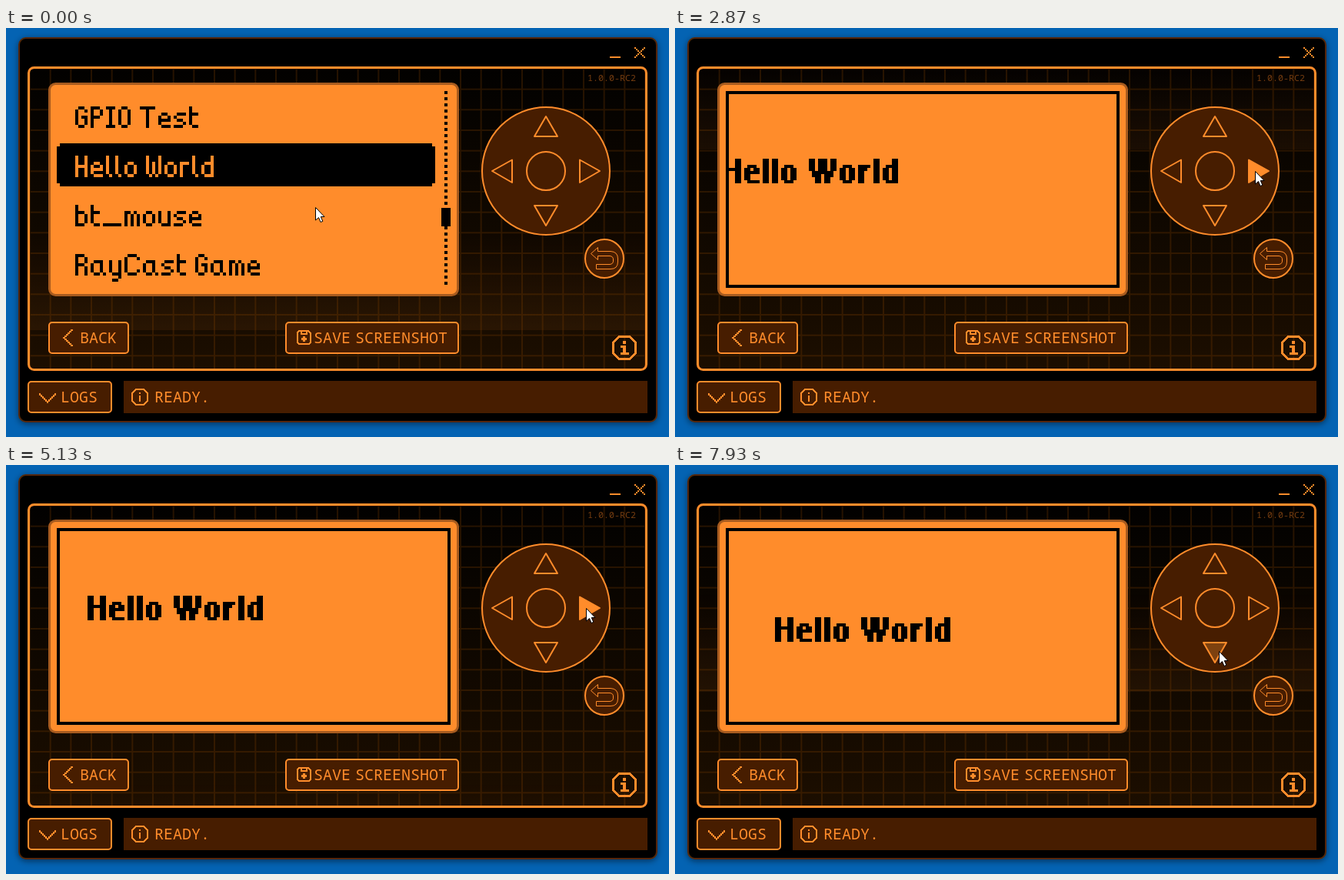
An HTML page for the animation above (8 s loop, 862 by 532 pixels).

```html
<!DOCTYPE html>
<html lang="en">
<head>
<meta charset="utf-8">
<title>Device screen</title>
<style>
  html, body { margin: 0; width: 100%; height: 100%; overflow: hidden; background: #0463b3; }
  svg { display: block; width: 862px; height: 532px; --o: #ff8c2b; --b: #471d00; }
  text { font: 20px "Noto Sans Mono", "DejaVu Sans Mono", monospace; fill: var(--o); word-spacing: -6px; }
  .version { font-size: 11.67px; fill: #753d10; }
  .btn { fill: var(--b); stroke: var(--o); stroke-width: 2; stroke-linejoin: round; }
  .line { fill: none; stroke: var(--o); stroke-width: 2; }
  .solid { fill: var(--o); }
  .pixel { shape-rendering: crispEdges; }
  .glyphs { fill: none; stroke: #000; stroke-linecap: square; }
  .glyphs.light { stroke: var(--o); }
  .hover { fill: #7d410f; }
  .press { fill: var(--o); }

  #band, #cursor, #menu, #app { animation: 8s linear infinite; }
  #band { animation-name: sweep; }
  #cursor { animation-name: point; animation-timing-function: ease-in-out; }
  #menu { animation-name: leave; animation-timing-function: step-end; }
  #app { animation-name: enter; animation-timing-function: step-end; }
  @keyframes sweep {
    0% { transform: translateY(393px); }
    12.5% { transform: translateY(563px); }
    12.51%, 27.5% { transform: translateY(44px); }
    65% { transform: translateY(554px); }
    65.01%, 80.6% { transform: translateY(44px); }
    100% { transform: translateY(307px); }
  }
  @keyframes point {
    0%, 1.6% { transform: translate(402px, 233px); }
    6.6%, 17.5% { transform: translate(707px, 186px); }
    19.5%, 76.9% { transform: translate(754px, 186px); }
    80%, 100% { transform: translate(707px, 242px); }
  }
  @keyframes leave { 0% { opacity: 1; } 10%, 100% { opacity: 0; } }
  @keyframes enter { 0% { opacity: 0; } 10%, 100% { opacity: 1; } }
</style>
</head>
<body>
<svg viewBox="0 0 862 532">
  <defs>
    <linearGradient id="depth" x2="0" y2="1">
      <stop stop-color="#020100"/><stop offset="1" stop-color="#1c0e00"/>
    </linearGradient>
    <linearGradient id="glow" x2="0" y2="1">
      <stop stop-color="#ff8c2b" stop-opacity="0"/><stop offset="1" stop-color="#ff8c2b" stop-opacity=".075"/>
    </linearGradient>
    <pattern id="grid" x="30" y="52" width="26.667" height="26.667" patternUnits="userSpaceOnUse">
      <path d="M0 1H27M1 0V27" fill="none" stroke="#8c4600" stroke-opacity=".26" stroke-width="2"/>
    </pattern>
    <filter id="shade" x="-5%" y="-5%" width="110%" height="110%">
      <feDropShadow dx="0" dy="2" stdDeviation="4" flood-opacity=".5"/>
    </filter>
    <clipPath id="inside"><rect x="30" y="52" width="802" height="392" rx="6"/></clipPath>
    <clipPath id="lcd"><rect x="66" y="82" width="512" height="256"/></clipPath>
  </defs>

  <rect width="862" height="532" fill="#0463b3"/>
  <rect x="17" y="13" width="829" height="499" rx="9" stroke="#552807" stroke-width="2" filter="url(#shade)"/>
  <path class="line pixel" d="M785 38h14"/>
  <g id="close" class="solid pixel"></g>

  <g clip-path="url(#inside)">
    <rect x="30" y="52" width="802" height="392" fill="url(#depth)"/>
    <rect id="band" x="30" y="-130" width="802" height="130" fill="url(#glow)"/>
    <rect x="30" y="52" width="802" height="392" fill="url(#grid)"/>
  </g>
  <rect class="line" x="29.5" y="51.5" width="803" height="393" rx="7" style="stroke-width:3"/>
  <text class="version" x="819" y="69" text-anchor="end">1.0.0-RC2</text>

  <rect x="56.5" y="72.5" width="531" height="275" rx="8" fill="#ff8c2b" stroke="#a75b1f" stroke-width="3"/>
  <g id="menu" class="pixel">
    <path d="M70 150H554v4h4v48h-4v4H70v-4h-4v-48h4z"/>
    <path d="M572 82V338" stroke="#000" stroke-width="4" stroke-dasharray="4"/>
    <rect x="566" y="234" width="12" height="24"/>
  </g>
  <g id="app" class="pixel">
    <g clip-path="url(#lcd)"><g id="hello"></g></g>
    <rect x="68" y="84" width="508" height="252" fill="none" stroke="#000" stroke-width="4"/>
  </g>

  <g class="btn">
    <circle cx="702" cy="186" r="83"/>
    <circle id="ok" cx="702" cy="186" r="25"/>
    <path d="M702 115L717 141H687z"/>
    <path d="M632 186L658 171.500V201z"/>
    <path id="right" d="M772 186L746 171.500V201z"/>
    <path id="down" d="M702 257L717 231H687z"/>
    <circle cx="778" cy="300" r="25"/>
    <path d="M760.500 293.500L769.500 285.500V290.500H786Q795.500 291 795.500 300V304Q795.500 313.500 786 313.500H767.500V307.500H785Q789.500 307 789.500 303V301Q789.500 297 785 296.500H769.500V301.500z" stroke-width="1"/>
    <rect x="56" y="383" width="103" height="40" rx="4"/>
    <rect x="364" y="383" width="224" height="40" rx="4"/>
    <rect x="29" y="460" width="108" height="40" rx="4"/>
  </g>
  <rect x="153" y="459" width="681" height="42" fill="#471d00"/>

  <g id="chevrons" class="solid pixel"></g>
  <g class="pixel">
    <path class="line" d="M381 394H393L396 397V409L394 411H381L379 409V396zM384 394v4h7v-4"/>
    <path class="solid" d="M386 401h3v2h2v3h-2v2h-3v-2h-2v-3h2z"/>
    <path class="line" d="M797 401.500H811L818.500 409V423L811 430.500H797L789.500 423V409z" style="stroke-width:3"/>
    <path class="solid" d="M802 407h4v4h-4zM799 413h7v9h4v3h-11v-3h3v-6h-3z"/>
    <path class="line" d="M169 470H179L184 475V485L179 490H169L164 485V475z"/>
    <path class="solid" d="M173 474h2v2h-2zM173 478h2v8h-2z"/>
  </g>
  <text x="96" y="410">BACK</text>
  <text x="400" y="410">SAVE SCREENSHOT</text>
  <text x="71" y="487">LOGS</text>
  <text x="193" y="487">READY.</text>

  <path id="cursor" d="M.5 .5V17L4.500 13.500L7 19.500L9.800 18.300L7.300 12.500H12z" fill="#fff" stroke="#000"/>
</svg>
<script>
  const $ = id => document.getElementById(id);
  const add = (parent, tag, attrs) => {
    const el = document.createElementNS('http://www.w3.org/2000/svg', tag);
    for (const key in attrs) el.setAttribute(key, attrs[key]);
    return parent.appendChild(el);
  };

  // Pen strokes on a cell grid, one cell thick
  const bowl = 'M1 2h1M0 3v2M1 6h1';
  const loop = 'M0 0v6M1 0h1M3 1v1M1 3h1';
  const thin = {
    space: 2, smear: 0,
    width: { I: 3, T: 5, W: 5, C: 5, _: 6, a: 5, l: 2, m: 5, r: 3, t: 3 },
    G: 'M1 0h1M0 1v4M1 6h1M3 1h0M3 5v-2h-1',
    P: loop,
    R: loop + 'M3 4v2',
    I: 'M0 0h2M1 0v6M0 6h2',
    O: 'M1 0h1M3 1v4M1 6h1M0 1v4',
    T: 'M0 0h4M2 0v6',
    H: 'M0 0v6M3 0v6M0 3h3',
    W: 'M0 0v5M1 6h0M2 2v3M3 6h0M4 0v5',
    C: 'M1 0h2M4 1h0M0 1v4M1 6h2M4 5h0',
    _: 'M0 6h5',
    a: bowl + 'M3 2v3M4 6h0',
    b: 'M0 0v6M1 2h1M3 3v2M1 6h1',
    d: bowl + 'M3 0v6',
    e: bowl + 'M3 3v1h-3M2 6h1',
    l: 'M0 0v5M1 6h0',
    m: 'M0 2v4M1 2h0M2 3v3M3 2h0M4 3v3',
    o: bowl + 'M3 3v2',
    r: 'M0 2v4M1 2h1',
    s: 'M1 2h2M0 3h0M1 4h1M3 5h0M0 6h2',
    t: 'M0 0v5M0 2h2M1 6h1',
    u: 'M0 2v3M1 6h1M3 2v4',
    y: 'M0 2v3M1 6h1M3 2v5M1 8h1'
  };
  // Bold repeats every stroke one cell to the right
  const round = 'M1 2h1M0 3v3M1 7h1';
  const bold = {
    space: 3, smear: 1,
    width: { H: 5, l: 1, r: 3, W: 8 },
    H: 'M0 0v7M4 0v7M0 3h4',
    e: round + 'M3 3v1h-3M2 7h1',
    l: 'M0 0v7',
    o: round + 'M3 3v3',
    W: 'M0 0v3M1 4v1M2 5v2M3 0v4M4 0v4M5 5v2M6 4v1M7 0v3',
    r: 'M0 2v5M1 3h0M2 2h0',
    d: round + 'M3 0v7'
  };

  function write(parent, words, font, x, y, tone = '') {
    const g = add(parent, 'g', {
      class: 'glyphs ' + tone, role: 'img', 'aria-label': words,
      transform: `translate(${x} ${y}) scale(4) translate(.5 .5)`
    });
    let pen = 0;
    for (const ch of words) {
      if (ch === ' ') { pen += font.space; continue; }
      for (let i = 0; i <= font.smear; i++)
        add(g, 'path', { d: font[ch], transform: `translate(${pen + i} 0)` });
      pen += (font.width[ch] || 4) + font.smear + 1;
    }
  }

  ['GPIO Test', 'Hello World', 'bt_mouse', 'RayCast Game'].forEach((item, i) =>
    write($('menu'), item, thin, 90, 102 + 64 * i, i === 1 ? 'light' : ''));
  write($('hello'), 'Hello World', bold, 0, 0);

  const dot = (parent, x, y, w = 2, h = 2) => add(parent, 'rect', { x, y, width: w, height: h });
  for (let i = 0; i < 7; i++) {
    dot($('close'), 817 + 2 * i, 25 + 2 * i);
    dot($('close'), 817 + 2 * i, 37 - 2 * i);
  }
  for (let i = -5; i <= 5; i++) {
    const n = Math.abs(i);
    dot($('chevrons'), 74 + 2 * n, 402 + 2 * i, 3, 2);
    dot($('chevrons'), 53 + 2 * i, 485 - 2 * n, 2, 3);
  }

  // Clicks so far at given times, in ms
  const rightClicks = [[1500, 0], [2270, 4.7], [3470, 10.2], [4530, 15.7], [4870, 16.7], [5800, 22.2], [6110, 24.6]];
  const downClicks = [[6450, .5], [6870, 2.6], [7530, 5.5], [7930, 7.7], [8000, 7.9]];

  function count(keys, t) {
    if (t <= keys[0][0]) return keys[0][1];
    for (let i = 1; i < keys.length; i++) {
      const [t0, n0] = keys[i - 1], [t1, n1] = keys[i];
      if (t < t1) return n0 + (n1 - n0) * (t - t0) / (t1 - t0);
    }
    return keys[keys.length - 1][1];
  }
  const held = n => n >= 1 && n % 1 < .45;
  const look = (id, hover, press) =>
    $(id).setAttribute('class', press ? 'press' : hover ? 'hover' : '');

  let start;
  function draw(now) {
    start ??= now;
    const t = (now - start) % 8000;
    const right = count(rightClicks, t), down = count(downClicks, t);
    const x = 66 + 4 * (Math.floor(right) - 8), y = 170 + 4 * Math.floor(down);
    $('hello').setAttribute('transform', `translate(${x} ${y})`);
    look('ok', t > 470 && t < 1450, t > 725 && t < 865);
    look('right', t > 1510 && t < 6210, held(right));
    look('down', t > 6340, held(down));
    requestAnimationFrame(draw);
  }
  requestAnimationFrame(draw);
</script>
</body>
</html>
```
